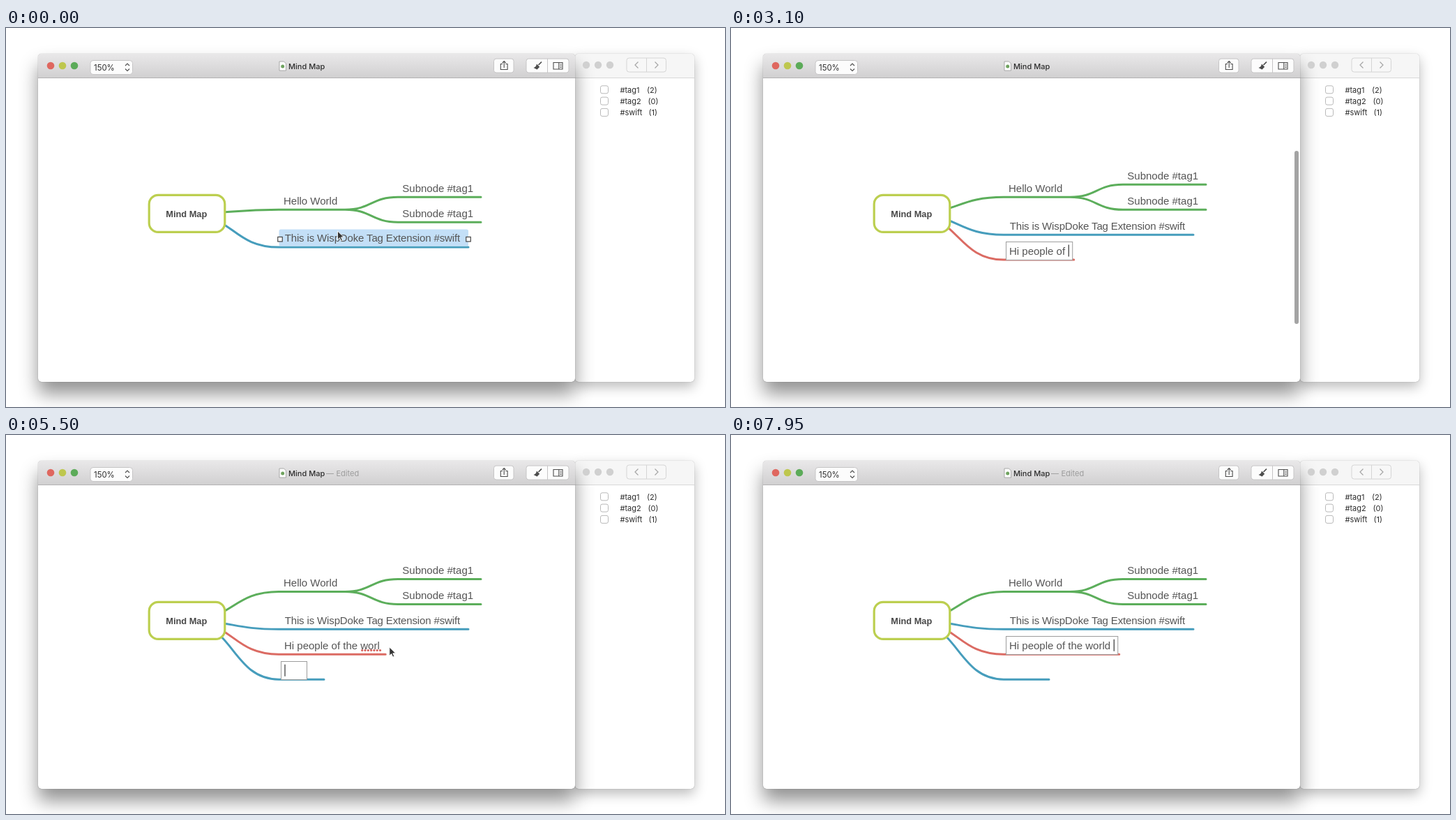
These frames come from a looping animation (1031 by 543 pixels, 8 s). An HTML page:

```html
<!DOCTYPE html>
<html lang="en">
<head>
<meta charset="utf-8">
<title>Mind Map</title>
<style>
html, body { margin: 0; width: 100%; height: 100%; overflow: hidden; background: #fff; }
#stage { position: relative; width: 1031px; height: 543px; overflow: hidden; background: #fff; }
.win { position: absolute; top: 37px; height: 470px; background: #fff; }
#side { left: 816px; width: 171px; border-radius: 5px;
  box-shadow: 0 0 1px rgba(0,0,0,.45), 0 7px 18px rgba(0,0,0,.27); }
#main { left: 46px; width: 770px; border-radius: 5px;
  box-shadow: 0 0 1px rgba(0,0,0,.55), 0 17px 27px rgba(0,0,0,.43); }
.bar { height: 34px; border-radius: 5px 5px 0 0; }
#main .bar { background: linear-gradient(#e9e8e9, #d1d0d1); border-bottom: 1px solid #b3b2b3; }
#side .bar { background: #f6f6f6; border-bottom: 1px solid #d8d8d8; }
svg { position: absolute; left: 0; top: 0; }
text { white-space: pre; }
.ui { font: 11px Inter, sans-serif; fill: #2c2c2c; }
.node { font: 15px "Liberation Sans", sans-serif; fill: #555; }
.long { letter-spacing: -.14px; }
.root { font: bold 12.8px "Liberation Sans", sans-serif; fill: #484848; }
.btn { fill: #fcfcfc; stroke: #c6c5c6; }
.off { fill: #f7f7f7; stroke: #d5d5d5; }
.icon { fill: none; stroke: #4c4c4c; stroke-width: 1.1; }
.line { fill: none; stroke-width: 3; stroke-linecap: round; }
</style>
</head>
<body>
<div id="stage">
  <div class="win" id="side"><div class="bar"></div></div>
  <div class="win" id="main"><div class="bar"></div></div>
  <svg width="1031" height="543" viewBox="0 0 1031 543">
    <g id="chrome">
      <circle cx="64" cy="54" r="5.3" fill="#df675f"/>
      <circle cx="81" cy="54" r="5.3" fill="#bec74e"/>
      <circle cx="98" cy="54" r="5.3" fill="#5cab59"/>
      <rect class="btn" x="121" y="46.5" width="60.5" height="20" rx="4"/>
      <text class="ui" x="126" y="60.8" style="font-size:11.4px">150%</text>
      <path class="icon" d="M171 54l3-3 3 3M171 58.500l3 3 3-3" stroke-width="1.300"/>
      <path d="M392 48h6.500l3 3v10h-9.500z" fill="#fdfdfd" stroke="#999" stroke-width=".8"/>
      <circle cx="396.700" cy="55" r="2.500" fill="#6fa35f"/>
      <text class="ui" x="405" y="59" font-weight="500" style="font-weight:500">Mind Map</text>
      <g id="edited">
        <text class="ui" x="459" y="59" style="fill:#9b9b9b">—</text>
        <text class="ui" x="473.500" y="59" style="fill:#9b9b9b">Edited</text>
      </g>
      <rect class="btn" x="699.500" y="44" width="28.500" height="20" rx="3.500"/>
      <path class="icon" d="M712 51.500h-2.700v8h9.800v-8h-2.700M714.200 57v-9M711.500 50.200l2.700-2.700 2.700 2.700"/>
      <rect class="btn" x="746" y="44" width="61" height="20" rx="3.500"/>
      <path d="M776.500 44v20" stroke="#c6c5c6"/>
      <path d="M768 48.500l-4.500 4.500" stroke="#4c4c4c" stroke-width="1.700"/>
      <path d="M761 51.500l4.200 4.200-3.700 3.800-5-2.500q3.500-1 4.500-5.500z" fill="#4c4c4c"/>
      <path class="icon" d="M785 49.500h13v9.500h-13zM792.800 49.500v9.500M794.500 52h2M794.500 54.300h2M794.500 56.500h2"/>
      <circle cx="832" cy="53" r="5.200" fill="#d0d0d0"/>
      <circle cx="849" cy="53" r="5.200" fill="#d0d0d0"/>
      <circle cx="866" cy="53" r="5.200" fill="#d0d0d0"/>
      <rect class="off" x="890" y="43" width="56.500" height="20" rx="3.500"/>
      <path d="M918.500 43v20" stroke="#d5d5d5"/>
      <path d="M906.500 48.500l-4.500 4.500 4.500 4.500M930.500 48.500l4.500 4.500-4.500 4.500" fill="none" stroke="#a5a5a5" stroke-width="1.200"/>
    </g>
    <g id="map"></g>
    <rect id="scroll" x="808" width="6" rx="3" fill="#787878"/>
    <path id="arrow" d="M0 0v12.200l2.900-2.600 2 4.500 2.100-.9-2-4.400h3.900z" fill="#333" stroke="#fff" stroke-width=".9"/>
    <path id="beam" d="M-3-7q3 0 3 2v10q0 2-3 2M3-7q-3 0-3 2v10q0 2 3 2M-1.500 2h3" fill="none" stroke="#444" stroke-width="1.100"/>
  </svg>
</div>
<script>
const LOOP = 8000, STEP = 17.9;
const GREEN = '#5cae5b', BLUE = '#469dbc', RED = '#db6b63';
const ADD1 = 350, ADD2 = 4950, COMMIT = 4100, CLICK = 5750, EDIT = 5950, TYPE_D = 7300, TYPE_SPACE = 7650;
const PHRASE = 'Hi people of the worl';
const $ = id => document.getElementById(id);
const map = $('map');

function make(tag, attrs, parent = map) {
  const el = document.createElementNS('http://www.w3.org/2000/svg', tag);
  set(el, attrs);
  parent.appendChild(el);
  return el;
}
function set(el, attrs) {
  for (const k in attrs) el.setAttribute(k, attrs[k]);
}
const show = (el, on) => el.setAttribute('visibility', on ? 'visible' : 'hidden');
const clamp = v => Math.max(0, Math.min(1, v));
const smooth = v => { v = clamp(v); return v * v * (3 - 2 * v); };
const ramp = (t, a, b) => clamp((t - a) / (b - a));
const label = (x, str, cls = 'node') => {
  const el = make('text', { x, class: cls });
  el.textContent = str;
  return el;
};
const line = color => make('path', { class: 'line', stroke: color });
const curve = (x1, y1, x2, y2) => {
  const m = (x1 + x2) / 2;
  return `M${x1} ${y1}C${m} ${y1} ${m} ${y2} ${x2} ${y2}`;
};
const branch = (y, end) => curve(259, 266, 391, y) + `H${end}`;

// Tag list
['#tag1', '#tag2', '#swift'].forEach((tag, i) => {
  const y = 88.3 + i * 16.3, chrome = $('chrome');
  make('rect', { x: 852.5, y: y - 5.5, width: 11, height: 11, rx: 2.5, fill: '#fff', stroke: '#b9b9b9' }, chrome);
  make('text', { x: 880.5, y: y + 4.2, class: 'ui' }, chrome).textContent = tag;
  make('text', { x: [919, 920.5, 921.5][i], y: y + 4.2, class: 'ui' }, chrome).textContent = `(${[2, 0, 1][i]})`;
});

// Map parts, back to front
const extraLine = line(BLUE), redLine = line(RED), swiftLine = line(BLUE), greenLine = line(GREEN);
make('rect', { x: 205.2, y: 239.4, width: 108.6, height: 53, rx: 13, fill: '#fff', stroke: '#bccf50', 'stroke-width': 3.2 });
set(label(229.3, 'Mind Map', 'root'), { y: 271 });
const glow = make('rect', { x: 391.5, height: 24, rx: 2.5, fill: '#c3dff7' });
const plus = make('g', { fill: 'none', stroke: '#c9c9c9' });
make('path', { d: 'M547 0H565M569.500 0h10M574.500-5v10' }, plus);
make('rect', { x: 565.5, y: -9, width: 18, height: 18, rx: 4 }, plus);
const hello = label(398, 'Hello World');
const subs = [label(568.3, 'Subnode #tag1'), label(568.3, 'Subnode #tag1')];
const swift = label(399.7, 'This is WispDoke Tag Extension #swift', 'node long');
const box = make('rect', { x: 394.5, fill: '#fff', stroke: '#9c9c9c' });
const dots = make('g', { fill: '#d4615a' });
for (let i = 0; i < 7; i++) make('circle', { cx: 510.7 + i * 4.3, cy: 0, r: 1.6 }, dots);
const words = label(399, '');
const caret = make('path', { stroke: '#333', 'stroke-width': 1.2 });
const grips = [0, 1].map(() => make('rect', { width: 6.5, height: 6.5, fill: '#fff', stroke: '#444', 'stroke-width': 1.2 }));

const pen = document.createElement('canvas').getContext('2d');
pen.font = '15px "Liberation Sans", sans-serif';
const widthOf = s => pen.measureText(s).width;

function typed(t) {
  if (t >= TYPE_D) return PHRASE + (t >= TYPE_SPACE ? 'd ' : 'd');
  if (t < 900) return '';
  const n = t < 3150 ? Math.min(13, 1 + Math.floor((t - 900) / 178)) : 14 + Math.floor((t - 3150) / 100);
  return PHRASE.slice(0, n);
}

const PATH = [[4850, 475.5, 291], [5100, 569.5, 296.5], [5300, 574, 301], [5600, 541.5, 305]];
function mouse(t) {
  for (let i = 1; i < PATH.length; i++) {
    const [ta, xa, ya] = PATH[i - 1], [tb, xb, yb] = PATH[i];
    if (t < tb) {
      const k = smooth((t - ta) / (tb - ta));
      return [xa + (xb - xa) * k, ya + (yb - ya) * k];
    }
  }
  return PATH[PATH.length - 1].slice(1);
}

function draw(t) {
  const first = smooth((t - ADD1) / 300), second = smooth((t - ADD2) / 370);
  const up = -STEP * (first + second);
  const green = 260.2 + up, blue = 314.1 + up, red = 332.1 - STEP * second, extra = 350.2;
  const hasRed = t >= ADD1, hasExtra = t >= ADD2;

  set(greenLine, { d: branch(green, 486) + curve(486, green, 562, green - 18) + 'H681' +
    curve(486, green, 562, green + 18) + 'H681' });
  set(swiftLine, { d: branch(blue, 663) });
  set(hello, { y: green - 7.7 });
  set(subs[0], { y: green - 25.7 });
  set(subs[1], { y: green + 10.3 });
  set(swift, { y: blue - 7.7 });

  const str = typed(t), end = 399.5 + widthOf(str);
  const editRed = hasRed && t < COMMIT || t >= EDIT;
  const editExtra = hasExtra && t < CLICK;
  const retouch = t >= EDIT && t < TYPE_D;
  words.textContent = str;
  set(words, { y: red - (editRed && !retouch ? 6.9 : 7.7) });
  set(redLine, { d: branch(red, Math.max(456, end + 8)) });
  set(extraLine, { d: branch(extra, 456) });
  show(redLine, hasRed);
  show(extraLine, hasExtra);
  show(dots, t >= COMMIT && t < TYPE_D);
  set(dots, { transform: `translate(0 ${red - 5.7})` });

  // Text field and caret
  const base = editExtra ? extra : red, caretX = editExtra ? 400 : end + .5;
  const right = editExtra ? 431.5 : Math.max(431.5, end + 6);
  set(box, { y: base - 25.7, width: right - 394.5, height: retouch ? 27 : 26 });
  show(box, editRed || editExtra);
  set(caret, { d: `M${caretX} ${base - 21.5}v17` });
  const blink = !retouch || (t - EDIT) % 1000 < 500;
  show(caret, (editRed || editExtra) && blink);

  // Selection
  const pickRed = t >= COMMIT && t < ADD2 || t >= CLICK && t < EDIT;
  const picked = !hasRed || pickRed;
  const selY = hasRed ? red : blue, selEnd = hasRed ? end + 8 : 663;
  set(glow, { y: selY - 25.7, width: selEnd - 391.5 });
  show(glow, picked);
  grips.forEach((g, i) => {
    set(g, { x: (i ? selEnd : 393) - 3.25, y: selY - 14.7 });
    show(g, picked);
  });
  set(plus, { transform: `translate(0 ${red})`,
    opacity: .4 * ramp(t, CLICK, CLICK + 150) * (1 - ramp(t, 6150, 6400)) });

  show($('edited'), t >= COMMIT);

  // Overlay scroller
  const late = t > 5000;
  set($('scroll'), {
    y: late ? 182 : 176, height: late ? 237 : 248,
    opacity: late ? ramp(t, 5900, 6000) * (1 - ramp(t, 6450, 6700))
                  : ramp(t, 2500, 2600) * (1 - ramp(t, 3020, 3270))
  });

  // Pointer
  const [x, y] = t < ADD1 ? [475.5, 291] : mouse(t);
  set($('arrow'), { transform: `translate(${x} ${y})` });
  set($('beam'), { transform: `translate(${x} ${y})` });
  show($('arrow'), t < ADD1 || t >= 4850 && t < EDIT);
  show($('beam'), retouch);
}

function frame() {
  draw(performance.now() % LOOP);
  requestAnimationFrame(frame);
}
frame();
</script>
</body>
</html>
```
